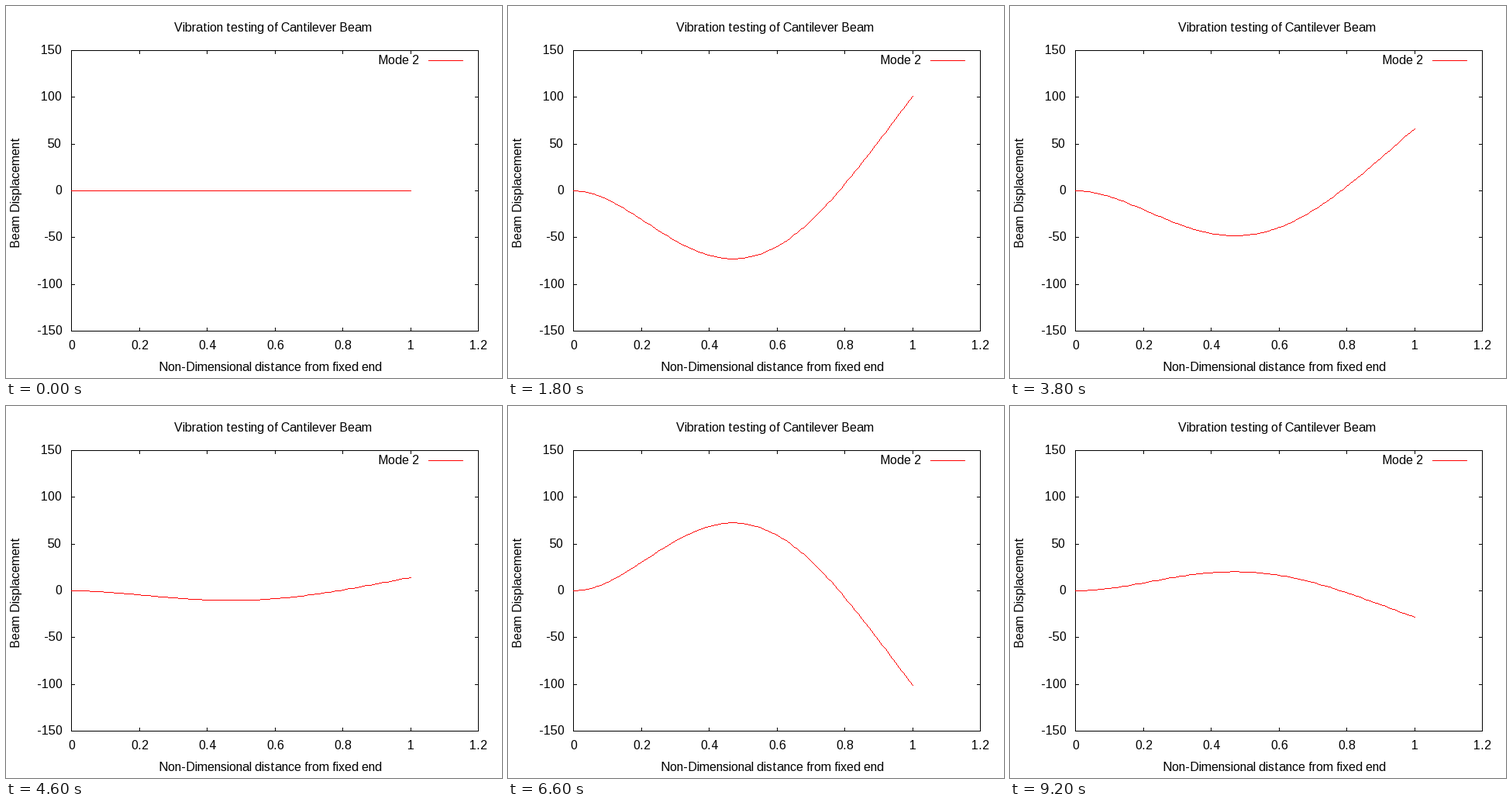
A matplotlib script for the animation above (9400 ms loop, 640 px wide and 480 px high).

```python
import numpy as np
import matplotlib.pyplot as plt
from matplotlib.animation import FuncAnimation

W, H, DPI = 640, 480, 100
LEFT, RIGHT, TOP, BOTTOM = 84, 609, 57, 419
TICK = 4
FONT_PX = 16
FRAMES, PERIOD = 47, 48
BLACK, RED = (0, 0, 0), (255, 0, 0)

plt.rcParams["font.family"] = "Liberation Sans"
plt.rcParams["font.size"] = FONT_PX * 72 / DPI
# Whole-pixel stems and advances
plt.rcParams["text.hinting"] = "force_autohint"
plt.rcParams["text.hinting_factor"] = 1

fig = plt.figure(figsize=(W / DPI, H / DPI), dpi=DPI, facecolor="white")


def col(x):
    """Pixel column of a distance along the beam."""
    return np.floor(LEFT + x * (RIGHT - LEFT) / 1.2 + 0.5 + 1e-9).astype(int)


def row(v):
    """Pixel row of a displacement."""
    up = np.floor((v + 150) * (BOTTOM - TOP) / 300 + 0.5 + 1e-9)
    return (BOTTOM - up).astype(int)


def label(x, y, text, rotation=0):
    """Text whose baseline starts at pixel (x, y)."""
    fig.text(x / W, 1 - y / H, text, rotation=rotation,
             rotation_mode="anchor", ha="left", va="baseline")


def text_width(number):
    widths = {"-": 5, ".": 4}
    return sum(widths.get(c, 9) for c in number)


def hline(img, y, x0, x1, color=BLACK):
    img[y, x0:x1 + 1] = color


def vline(img, x, y0, y1, color=BLACK):
    img[y0:y1 + 1, x] = color


def polyline(img, xs, ys, color):
    """One pixel wide line without smoothing."""
    for x0, y0, x1, y1 in zip(xs, ys, xs[1:], ys[1:]):
        n = max(abs(x1 - x0), abs(y1 - y0)) + 1
        px = np.floor(np.linspace(x0, x1, n) + 0.5).astype(int)
        py = np.floor(np.linspace(y0, y1, n) + 0.5).astype(int)
        img[py, px] = color


def mode_shape(x, beta=4.69409):
    """Second bending mode of a clamped-free beam, free end up."""
    a = np.cosh(beta) + np.cos(beta)
    b = np.sinh(beta) - np.sin(beta)
    z = beta * x
    return b * (np.sinh(z) - np.sin(z)) - a * (np.cosh(z) - np.cos(z))


def draw_chart():
    img = np.full((H, W, 3), 255, dtype=np.uint8)
    for y in (TOP, BOTTOM):
        hline(img, y, LEFT, RIGHT)
    for x in (LEFT, RIGHT):
        vline(img, x, TOP, BOTTOM)

    for i in range(7):
        text = f"{i / 5:g}"
        x = col(i / 5)
        vline(img, x, TOP, TOP + TICK)
        vline(img, x, BOTTOM - TICK, BOTTOM)
        label(x - text_width(text) // 2, 443, text)

    for v in range(-150, 151, 50):
        y = row(v)
        hline(img, y, LEFT, LEFT + TICK)
        hline(img, y, RIGHT - TICK, RIGHT)
        label(72 - text_width(str(v)), y + 5, str(v))

    label(217, 33, "Vibration testing of Cantilever Beam")
    label(197, 471, "Non-Dimensional distance from fixed end")
    label(18, 312, "Beam Displacement", rotation=90)
    label(480, 75, "Mode 2")
    hline(img, 70, 545, 589, RED)
    return img


chart = draw_chart()
beam_x = np.linspace(0, 1, 101)
beam_cols = col(beam_x)
shape = mode_shape(beam_x)
canvas = fig.figimage(chart, origin="upper")


def update(i):
    img = chart.copy()
    swing = np.sin(2 * np.pi * i / PERIOD)
    polyline(img, beam_cols, row(swing * shape), RED)
    canvas.set_data(img)
    return (canvas,)


anim = FuncAnimation(fig, update, frames=FRAMES, interval=200,
                     repeat=True, repeat_delay=0, blit=False)
plt.show()
```
